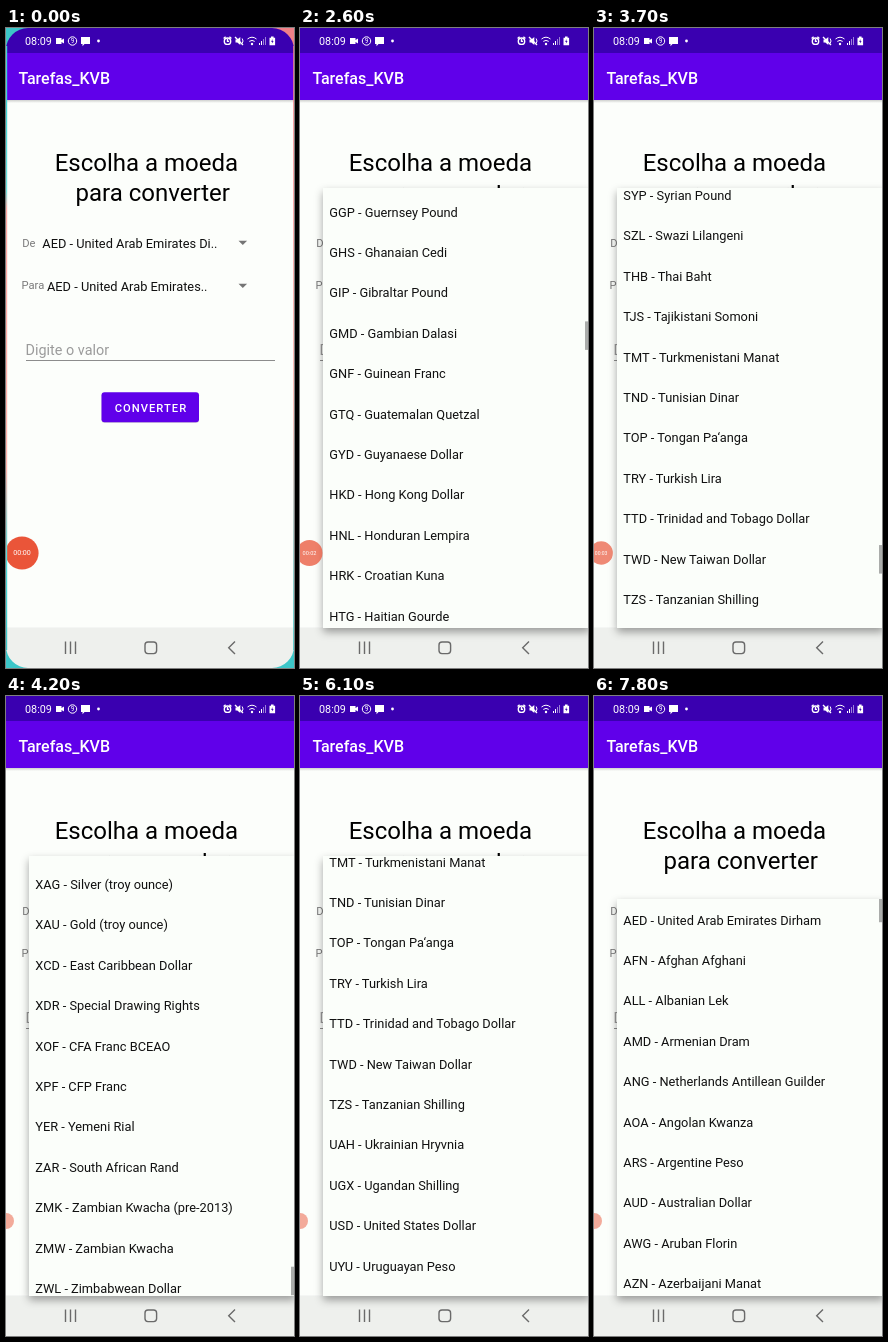
Write an HTML page that moves like this. It is 288 px wide and 640 px high and loops after 8000 ms.

```html
<!DOCTYPE html>
<html lang="pt">
<head>
<meta charset="utf-8">
<title>Conversor de moedas</title>
<style>
  html, body { margin: 0; width: 100%; height: 100%; overflow: hidden; background: #fcfefb; }
  svg { display: block; width: 100vw; height: 100vh; font-family: Roboto, "Noto Sans", sans-serif; }
  .body { font-size: 12.8px; fill: #111; }
  .label { font-size: 11.2px; fill: #7b7b7b; }
</style>
</head>
<body>
<svg viewBox="0 0 288 640" xmlns="http://www.w3.org/2000/svg">
  <defs>
    <filter id="shadow" x="-20%" y="-20%" width="140%" height="140%">
      <feDropShadow dx="0" dy="4" stdDeviation="4.5" flood-color="#000" flood-opacity=".36"/>
    </filter>
    <linearGradient id="barShade" x2="0" y2="1">
      <stop stop-color="#000" stop-opacity=".18"/><stop offset="1" stop-color="#000" stop-opacity="0"/>
    </linearGradient>
    <linearGradient id="rim" x2="0" y2="1">
      <stop offset=".1" stop-color="#3fd6d6"/><stop offset=".24" stop-color="#6fe3df"/>
      <stop offset=".27" stop-color="#ffa9a4"/><stop offset=".7" stop-color="#ffb5ae"/>
      <stop offset=".85" stop-color="#4fdcda"/><stop offset="1" stop-color="#3cc6c8"/>
    </linearGradient>
    <linearGradient id="rimRight" x2="0" y2="1">
      <stop stop-color="#f77f86"/><stop offset=".6" stop-color="#ffb5ae"/><stop offset="1" stop-color="#3cc6c8"/>
    </linearGradient>
    <clipPath id="popupClip"><rect id="clipBox"/></clipPath>
  </defs>

  <rect width="288" height="640" fill="#fcfefb"/>
  <rect y="72" width="288" height="3" fill="url(#barShade)"/>
  <rect width="288" height="72" fill="#6000ea"/>
  <rect width="288" height="25" fill="#3a00b0"/>
  <text x="12.5" y="55.5" font-size="16" font-weight="500" fill="#fff">Tarefas_KVB</text>

  <g fill="#fff">
    <text x="19" y="17" font-size="10.8">08:09</text>
    <path d="M50 10h5.5v2l2.5-1.5v5l-2.5-1.5v2h-5.5z"/>
    <circle cx="66.5" cy="13" r="4.2" fill="none" stroke="#fff"/>
    <text x="66.5" y="15.4" font-size="6.5" text-anchor="middle">9</text>
    <path d="M75 9h9v7h-5.5l-2 2.2v-2.2h-1.5z"/>
    <circle cx="92.5" cy="13" r="1.4"/>
    <g fill="none" stroke="#fff">
      <g stroke-width="1.4">
        <circle cx="221.5" cy="13.2" r="3.2"/>
        <path d="M221.5 11v2.4h1.6M217.6 10.6l2-1.8M225.4 10.6l-2-1.8M229 9l8 8"/>
      </g>
      <path d="M236.2 10.5q1.6 2.5 0 5"/>
      <path d="M241.5 11q4.5-3.6 9 0M243.3 13.4q2.7-2 5.4 0"/>
      <path d="M253.5 17v-2M255.5 17v-4"/>
      <path d="M257.5 17v-6M259.5 17v-8" opacity=".5"/>
    </g>
    <path d="M229.5 11.5h1.8l3-2.6v8.2l-3-2.6h-1.8z"/>
    <circle cx="246" cy="16" r="1.2"/>
    <path d="M263.5 9.8h1.5v-1.2h2.6v1.2h1.5v7.4h-5.6z"/>
    <path d="M266.8 11l-1.8 2.8h1.2l-.4 2 1.8-2.8h-1.2z" fill="#3a00b0"/>
  </g>

  <g font-size="24" fill="#000">
    <text x="48.7" y="143.3">Escolha a moeda</text>
    <text x="69.5" y="173">para converter</text>
  </g>
  <text class="label" x="16.2" y="219">De</text>
  <text class="body" id="from" x="36.3" y="219.5"></text>
  <text class="label" x="15.5" y="261">Para</text>
  <text class="body" x="41" y="262.5">AED - United Arab Emirates..</text>
  <path d="M232.5 212.8h8.6l-4.3 4.3zM232.5 255.8h8.6l-4.3 4.3z" fill="#757575"/>
  <text x="19.6" y="326.5" font-size="14.4" fill="#9b9b9b">Digite o valor</text>
  <path d="M20 332.5H269" stroke="#8c8c8c"/>
  <rect x="95.5" y="365" width="97.5" height="30" rx="3" fill="#000" opacity=".15"/>
  <rect x="95.5" y="364.3" width="97.5" height="30" rx="3" fill="#6000ea"/>
  <text x="145" y="383.6" font-size="11.2" font-weight="500" letter-spacing="1" fill="#fff" text-anchor="middle">CONVERTER</text>

  <rect y="599.5" width="288" height="41" fill="#eef0ed"/>
  <g fill="none" stroke="#6a6a6a" stroke-width="1.4">
    <path d="M59.5 613.5v12.5M64.5 613.5v12.5M69.5 613.5v12.5M229 613.5l-6.3 6.3 6.3 6.3"/>
    <rect x="139" y="614" width="11.6" height="11.6" rx="3"/>
  </g>

  <g id="popup">
    <rect id="sheet" fill="#fbfefa" filter="url(#shadow)"/>
    <g clip-path="url(#popupClip)">
      <g id="rows" class="body"></g>
      <rect id="thumb" x="285" width="3" fill="#aaacaa"/>
    </g>
  </g>

  <g id="bubble">
    <circle r="17" fill="#ea5539"/>
    <text id="clock" y="2.5" font-size="7.3" fill="#fff" text-anchor="middle"></text>
  </g>

  <g id="glow">
    <path d="M0 0H22A22 22 0 0 0 0 22ZM0 640H22A22 22 0 0 1 0 618Z" fill="#3cc6c8"/>
    <path d="M288 0H266A22 22 0 0 1 288 22Z" fill="#f08088"/>
    <path d="M288 640H266A22 22 0 0 0 288 618Z" fill="#3cc6c8"/>
    <rect y="18" width="1.2" height="604" fill="url(#rim)"/>
    <rect x="287.2" y="18" width=".8" height="604" fill="url(#rimRight)"/>
  </g>
</svg>

<script>
const CURRENCIES = `AED United Arab Emirates Dirham|AFN Afghan Afghani|ALL Albanian Lek|AMD Armenian Dram|ANG Netherlands Antillean Guilder|AOA Angolan Kwanza|ARS Argentine Peso|AUD Australian Dollar|AWG Aruban Florin|AZN Azerbaijani Manat
BAM Bosnia-Herzegovina Convertible Mark|BBD Barbadian Dollar|BDT Bangladeshi Taka|BGN Bulgarian Lev|BHD Bahraini Dinar|BIF Burundian Franc|BMD Bermudan Dollar|BND Brunei Dollar|BOB Bolivian Boliviano|BRL Brazilian Real|BSD Bahamian Dollar|BTC Bitcoin|BTN Bhutanese Ngultrum|BWP Botswanan Pula|BYN New Belarusian Ruble|BYR Belarusian Ruble|BZD Belize Dollar
CAD Canadian Dollar|CDF Congolese Franc|CHF Swiss Franc|CLF Chilean Unit of Account (UF)|CLP Chilean Peso|CNY Chinese Yuan|COP Colombian Peso|CRC Costa Rican Colón|CUC Cuban Convertible Peso|CUP Cuban Peso|CVE Cape Verdean Escudo|CZK Czech Republic Koruna
DJF Djiboutian Franc|DKK Danish Krone|DOP Dominican Peso|DZD Algerian Dinar|EGP Egyptian Pound|ERN Eritrean Nakfa|ETB Ethiopian Birr|EUR Euro|FJD Fijian Dollar|FKP Falkland Islands Pound
GBP British Pound Sterling|GEL Georgian Lari|GGP Guernsey Pound|GHS Ghanaian Cedi|GIP Gibraltar Pound|GMD Gambian Dalasi|GNF Guinean Franc|GTQ Guatemalan Quetzal|GYD Guyanaese Dollar|HKD Hong Kong Dollar|HNL Honduran Lempira|HRK Croatian Kuna|HTG Haitian Gourde|HUF Hungarian Forint
IDR Indonesian Rupiah|ILS Israeli New Sheqel|IMP Manx pound|INR Indian Rupee|IQD Iraqi Dinar|IRR Iranian Rial|ISK Icelandic Króna|JEP Jersey Pound|JMD Jamaican Dollar|JOD Jordanian Dinar|JPY Japanese Yen
KES Kenyan Shilling|KGS Kyrgystani Som|KHR Cambodian Riel|KMF Comorian Franc|KPW North Korean Won|KRW South Korean Won|KWD Kuwaiti Dinar|KYD Cayman Islands Dollar|KZT Kazakhstani Tenge|LAK Laotian Kip|LBP Lebanese Pound|LKR Sri Lankan Rupee|LRD Liberian Dollar|LSL Lesotho Loti|LTL Lithuanian Litas|LVL Latvian Lats|LYD Libyan Dinar
MAD Moroccan Dirham|MDL Moldovan Leu|MGA Malagasy Ariary|MKD Macedonian Denar|MMK Myanma Kyat|MNT Mongolian Tugrik|MOP Macanese Pataca|MRO Mauritanian Ouguiya|MUR Mauritian Rupee|MVR Maldivian Rufiyaa|MWK Malawian Kwacha|MXN Mexican Peso|MYR Malaysian Ringgit|MZN Mozambican Metical
NAD Namibian Dollar|NGN Nigerian Naira|NIO Nicaraguan Córdoba|NOK Norwegian Krone|NPR Nepalese Rupee|NZD New Zealand Dollar|OMR Omani Rial|PAB Panamanian Balboa|PEN Peruvian Nuevo Sol|PGK Papua New Guinean Kina|PHP Philippine Peso|PKR Pakistani Rupee|PLN Polish Zloty|PYG Paraguayan Guarani|QAR Qatari Rial|RON Romanian Leu|RSD Serbian Dinar|RUB Russian Ruble|RWF Rwandan Franc
SAR Saudi Riyal|SBD Solomon Islands Dollar|SCR Seychellois Rupee|SDG Sudanese Pound|SEK Swedish Krona|SGD Singapore Dollar|SHP Saint Helena Pound|SLL Sierra Leonean Leone|SOS Somali Shilling|SRD Surinamese Dollar|STD São Tomé and Príncipe Dobra|SVC Salvadoran Colón|SYP Syrian Pound|SZL Swazi Lilangeni
THB Thai Baht|TJS Tajikistani Somoni|TMT Turkmenistani Manat|TND Tunisian Dinar|TOP Tongan Pa‘anga|TRY Turkish Lira|TTD Trinidad and Tobago Dollar|TWD New Taiwan Dollar|TZS Tanzanian Shilling|UAH Ukrainian Hryvnia|UGX Ugandan Shilling|USD United States Dollar|UYU Uruguayan Peso|UZS Uzbekistan Som
VEF Venezuelan Bolívar Fuerte|VND Vietnamese Dong|VUV Vanuatu Vatu|WST Samoan Tala|XAF CFA Franc BEAC|XAG Silver (troy ounce)|XAU Gold (troy ounce)|XCD East Caribbean Dollar|XDR Special Drawing Rights|XOF CFA Franc BCEAO|XPF CFP Franc|YER Yemeni Rial|ZAR South African Rand|ZMK Zambian Kwacha (pre-2013)|ZMW Zambian Kwacha|ZWL Zimbabwean Dollar`
  .split(/[|\n]/).map(s => s.slice(0, 3) + ' - ' + s.slice(4));

const LOOP = 8000, STEP = 100, ROW = 40.4, BOTTOM = 600, FROM_TOP = 160, TO_TOP = 203;
const $ = id => document.getElementById(id);
const set = (el, attrs) => { for (const k in attrs) el.setAttribute(k, attrs[k]); };
const clamp = x => Math.min(1, Math.max(0, x));
const mix = (a, b, p) => a + (b - a) * p;

// Piecewise linear track of [time, value] pairs.
function track(keys, t) {
  const i = keys.findIndex(k => k[0] > t);
  if (i === 0) return keys[0][1];
  if (i < 0) return keys[keys.length - 1][1];
  const [a, b] = [keys[i - 1], keys[i]];
  return mix(a[1], b[1], (t - a[0]) / (b[0] - a[0]));
}

// Scroll offset that puts the centre of a currency's row at height y.
const scrollTo = (code, y) =>
  CURRENCIES.findIndex(c => c.startsWith(code)) * ROW + FROM_TOP + 21 - y;
const END = CURRENCIES.length * ROW - (BOTTOM - FROM_TOP);

const SCROLL = [
  [2000, 0], [2300, scrollTo('BTN', 181)], [2600, scrollTo('GGP', 184)],
  [2900, scrollTo('KZT', 181)], [3200, scrollTo('MZN', 162)], [3500, scrollTo('SBD', 181)],
  [3800, scrollTo('TOP', 181)], [4000, scrollTo('VUV', 181)], [4200, scrollTo('XAG', 188.5)],
  [4400, END], [4700, END], [5000, scrollTo('UAH', 181)], [5200, scrollTo('TND', 172)],
  [5400, scrollTo('TMT', 166)]
];
const THUMB = [[4500, 1], [4700, 0], [4800, 1], [5500, 1], [5800, 0], [7000, 0], [7100, 1]];
const FADE = [[6100, 1], [6400, 0]];
const BUBBLE_X = [[1800, 16], [2100, 9.5], [3600, 9.5], [4000, 0]];
const BUBBLE_R = [[1800, 16.6], [2100, 13], [3600, 13], [4000, 8]];
const BUBBLE_ALPHA = [[1800, 1], [2100, .75], [3600, .75], [4000, .5]];

const rows = Array.from({ length: 13 }, () =>
  $('rows').appendChild(document.createElementNS('http://www.w3.org/2000/svg', 'text')));

function drawPopup(top, opened, scroll, alpha, thumbAlpha) {
  const p = clamp(opened / 300), e = 1 - (1 - p) ** 2;
  const shown = p > 0 && alpha > 0;
  $('popup').style.display = shown ? '' : 'none';
  if (!shown) return;
  $('popup').style.opacity = alpha * clamp(p * 4);

  const x = mix(27, 23, e), y = mix(top + 44, top, e);
  const box = { x, y, width: mix(258, 290, e) - x, height: mix(top + 44, BOTTOM, e) - y };
  set($('sheet'), box);
  set($('clipBox'), box);

  const dx = -8 * (1 - e), dy = -176 * (1 - e);
  const first = Math.max(0, Math.floor((scroll - dy) / ROW) - 1);
  rows.forEach((row, i) => {
    row.textContent = CURRENCIES[first + i] || '';
    set(row, { x: 29.3 + dx, y: top + 25.5 + (first + i) * ROW - scroll + dy });
  });

  const height = BOTTOM - top, total = CURRENCIES.length * ROW;
  set($('thumb'), {
    y: top + scroll / total * height + dy, height: height * height / total, opacity: thumbAlpha
  });
}

function draw(t) {
  $('from').textContent = t < 6200 ? 'AED - United Arab Emirates Di..' : 'USD - United States Dollar';

  if (t < 7000) drawPopup(FROM_TOP, t - 1350, track(SCROLL, t), track(FADE, t), track(THUMB, t));
  else drawPopup(TO_TOP, t - 7450, 0, 1, 1);

  set($('bubble'), {
    transform: `translate(${track(BUBBLE_X, t)} 525) scale(${track(BUBBLE_R, t) / 17})`,
    opacity: track(BUBBLE_ALPHA, t)
  });
  const seconds = Math.floor((t + 300) / 1200);
  $('clock').textContent = t < 3900 ? '00:0' + seconds : '';
  $('glow').style.opacity = track([[0, 1], [200, 0]], t);
}

function tick() {
  const t = performance.now() % LOOP;
  draw(Math.floor(t / STEP) * STEP);
  requestAnimationFrame(tick);
}
tick();
</script>
</body>
</html>
```
